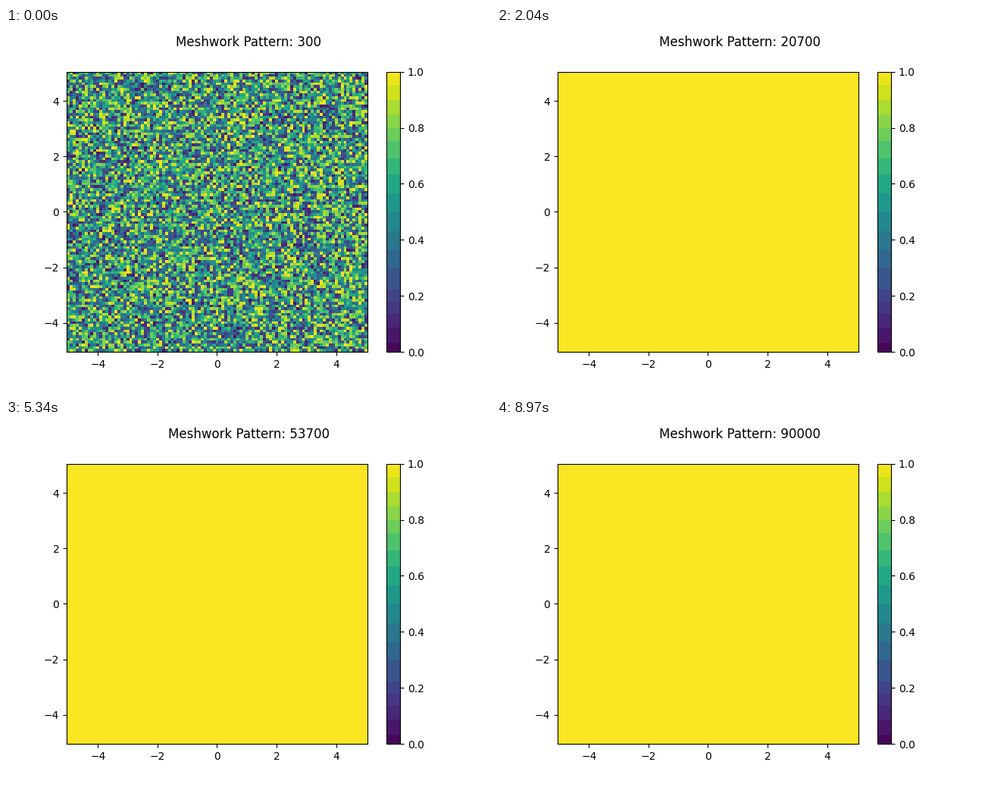
These frames come from a looping animation (640 px wide and 480 px high, 9000 ms). A matplotlib script:

```python
import numpy as np
import matplotlib.pyplot as plt
from matplotlib.animation import FuncAnimation
from matplotlib.colors import BoundaryNorm, ListedColormap

FRAMES = 300
INTERVAL = 30
STEPS_PER_FRAME = 300
DECAY = 0.075  # per frame
CELLS = 101
HALF = 5.05

# Uneven colour bands cut out of viridis
edges = np.array([0, .033, .087, .136, .18, .223, .298, .364, .43, .5, .565,
                  .635, .69, .753, .8, .848, .9, .953, .985, 1])
shades = plt.get_cmap("viridis")((edges[:-1] + edges[1:]) / 2)
cmap = ListedColormap(shades)
norm = BoundaryNorm(edges, cmap.N)

# Every cell relaxes exponentially towards 1
start = np.random.default_rng(7).random((CELLS, CELLS))


def field(frame):
    return 1 - (1 - start) * np.exp(-DECAY * (frame + 1))


fig, ax = plt.subplots(figsize=(6.4, 4.8), dpi=100)
mesh = ax.imshow(field(0), cmap=cmap, norm=norm, origin="lower",
                 extent=(-HALF, HALF, -HALF, HALF), aspect="auto",
                 interpolation="nearest")
bar = fig.colorbar(mesh, ax=ax, spacing="proportional",
                   ticks=np.linspace(0, 1, 6), format="%.1f")
bar.minorticks_off()
title = fig.suptitle("")


def update(frame):
    mesh.set_data(field(frame))
    title.set_text(f"Meshwork Pattern: {(frame + 1) * STEPS_PER_FRAME}")
    return mesh, title


anim = FuncAnimation(fig, update, frames=FRAMES, interval=INTERVAL,
                     repeat=True, repeat_delay=0)
plt.show()
```
